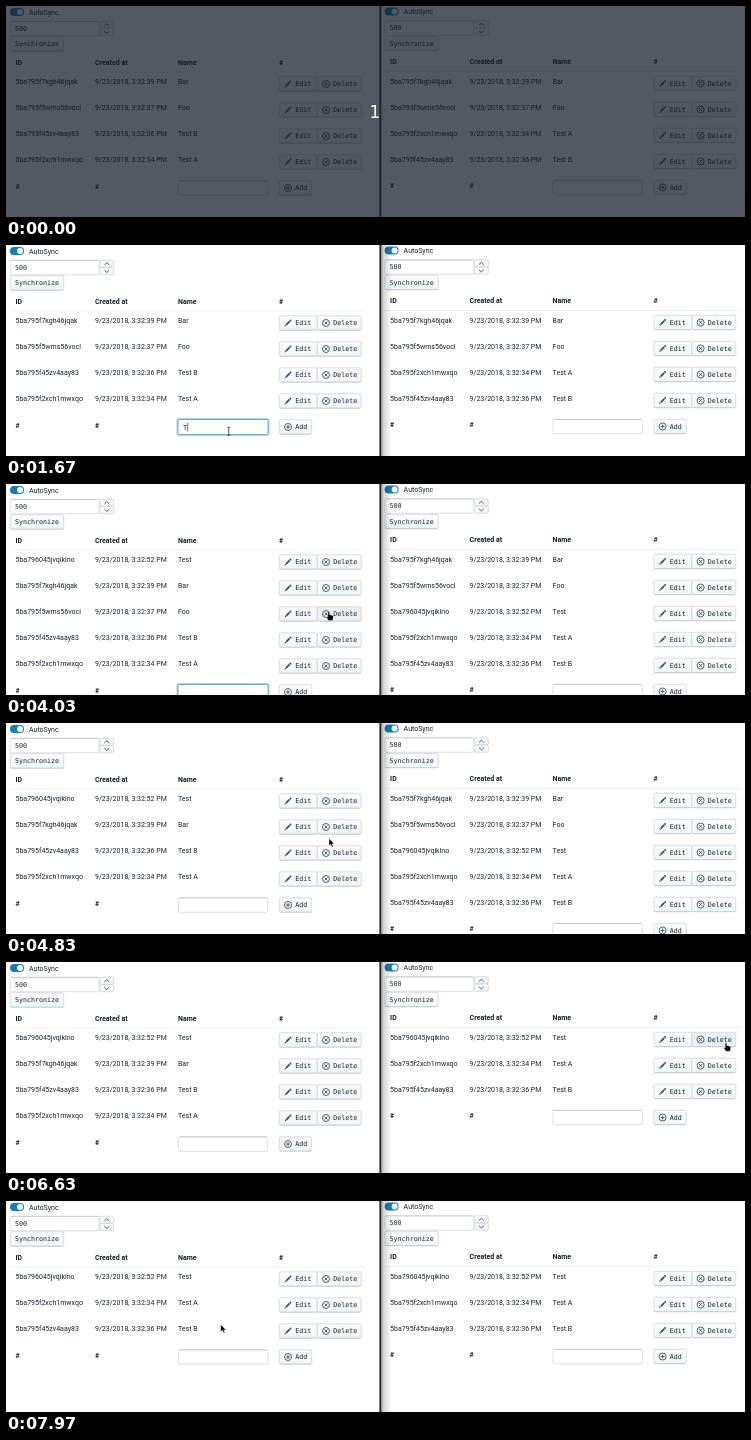
An HTML page that plays this animation: 739x211 px, repeating every 8000 ms.

```html
<!DOCTYPE html>
<html lang="en">
<head>
<meta charset="utf-8">
<title>Synchronized tables</title>
<style>
  html, body { margin: 0; width: 100%; height: 100%; overflow: hidden; background: #fff; }
  svg { display: block; width: 739px; height: 211px; }
  text { font: 7px Roboto, sans-serif; fill: #182026; white-space: pre; }
  .bold { font-weight: 700; }
  .mono { font: 6.67px "DejaVu Sans Mono", monospace; }
  .count { font: 17px "DejaVu Sans", sans-serif; fill: #fff; text-anchor: middle; }
  .icon { fill: #3f4d58; }
  .line { fill: none; stroke: #3f4d58; stroke-width: .9; }
</style>
</head>
<body>
<svg viewBox="0 0 739 211" xmlns="http://www.w3.org/2000/svg">
  <defs>
    <linearGradient id="face" x2="0" y2="1">
      <stop stop-color="#fafcfd"/><stop offset="1" stop-color="#f2f5f7"/>
    </linearGradient>
    <linearGradient id="shade">
      <stop stop-opacity=".4"/><stop offset=".25" stop-opacity=".16"/><stop offset="1" stop-opacity="0"/>
    </linearGradient>
    <g id="edit"><path class="icon" transform="scale(.5)" d="M3.2 10.3l2.5 2.5 6.7-6.7-2.5-2.5zM1 15l3.9-1.4-2.5-2.4zM13.2 1c-.5 0-.9.2-1.2.5l-1.4 1.4 2.4 2.5 1.5-1.4c.9-1.2.1-3-1.3-3z"/></g>
    <g id="delete" class="line"><circle cx="4" cy="4" r="3.5"/><path d="M2.5 2.5l3 3m0-3l-3 3"/></g>
    <g id="add" class="line"><circle cx="4" cy="4" r="3.5"/><path d="M2 4h4M4 2v4"/></g>
    <path id="arrow" d="M0 0v7.3l1.7-1.5 1.3 2.8 1.2-.5L3 5.4h2.3z" fill="#000" stroke="#fff" stroke-width=".4"/>
    <path id="hand" d="M-.8 .6q.8-1 1.5 0v2.5l3.3.8q1 .4.8 1.4l-.7 3.7H-.1L-2.2 5.8q.1-1 1.4-.2z" fill="#000" stroke="#fff" stroke-width=".4"/>
    <path id="beam" d="M-1.5-4h3M0-4v8M-1.5 4h3" stroke="#222" stroke-width=".7" fill="none"/>
  </defs>
  <rect width="739" height="211" fill="#fff"/>
  <g id="right" transform="translate(374.6 -.5)"></g>
  <rect id="shadow" x="375" height="211" fill="url(#shade)"/>
  <rect width="374" height="211" fill="#fff"/>
  <g id="left"></g>
  <rect x="373.4" width="1.7" height="211" fill="#24282c"/>
  <use id="cursor"/>
  <g id="countdown">
    <rect width="739" height="211" fill="#141c26" fill-opacity=".73"/>
    <text class="count" x="369" y="111.5">1</text>
  </g>
</svg>
<script>
const LOOP = 8000, PITCH = 26, FIRST = 78;
const RIGHT = { x: 374.6, y: -.5 }, LEFT = { x: 0, y: 0 };
const EVER = [0, Infinity];

// left / right: the span of time in which each pane lists the item
const items = [
  { id: '5ba796045jvqiklno', name: 'Test', time: '3:32:52', left: [2330, Infinity], right: [2970, Infinity] },
  { id: '5ba795f7kgh46jqak', name: 'Bar', time: '3:32:39', left: [0, 7000], right: [0, 6430] },
  { id: '5ba795f5wms56vocl', name: 'Foo', time: '3:32:37', left: [0, 4470], right: [0, 4970] },
  { id: '5ba795f45zv4aay83', name: 'Test B', time: '3:32:36', left: EVER, right: EVER },
  { id: '5ba795f2xch1mwxqo', name: 'Test A', time: '3:32:34', left: EVER, right: EVER }
];

// pointer stops: time, x, y
const path = [
  [430, 201, 31], [730, 222.7, 186.3], [3470, 222.7, 186.3], [4030, 322.6, 127.5],
  [4470, 322.6, 127.5], [5170, 323.4, 104.5], [5370, 323.4, 104.5], [5470, 503.5, 108],
  [5740, 503.5, 108], [5770, 729, 101.5], [5970, 729, 101.5], [6230, 720, 80.3],
  [6730, 720, 80.3], [7230, 226.5, 57.5], [7370, 228, 57.5], [7870, 228, 57.5], [7970, 214.7, 123.5]
];

const $ = id => document.getElementById(id);
const between = (t, [from, to]) => t >= from && t < to;
const inside = (p, b) => p.x >= b.x && p.x < b.x + b.w && p.y >= b.y && p.y < b.y + 15;

function pointer(t) {
  let i = path.findIndex(k => k[0] > t);
  if (i < 0) i = path.length;
  const a = path[Math.max(i - 1, 0)], b = path[Math.min(i, path.length - 1)];
  const u = b[0] > a[0] ? (t - a[0]) / (b[0] - a[0]) : 0;
  const e = u * u * (3 - 2 * u);
  return { x: a[1] + (b[1] - a[1]) * e, y: a[2] + (b[2] - a[2]) * e };
}

const byName = (a, b) => a.name < b.name ? -1 : 1;
const byTime = (a, b) => a.time < b.time ? 1 : -1;
const byNameDown = (a, b) => byName(b, a);

function rows(side, t) {
  const order = side === 'right' || t >= 7900 ? byName : t >= 7570 ? byNameDown : byTime;
  return items.filter(item => between(t, item[side])).sort(order);
}

const text = (x, y, s, cls = '') => `<text x="${x}" y="${y + 2.5}" class="${cls}">${s}</text>`;

const box = (x, y, w, h, fill, line) =>
  `<rect x="${x + .25}" y="${y + .25}" width="${w - .5}" height="${h - .5}" rx="1.5" fill="${fill}" stroke="${line}" stroke-width=".6"/>`;

const field = (x, y, w) => box(x, y, w, 15, '#fff', '#c6cbcf') +
  `<path d="M${x + 1} ${y + .5}h${w - 2}" stroke="#aeb5ba" stroke-width=".5"/>`;

function button(b, label, icon, hover) {
  const tx = b.x + (icon ? 16.2 : 5);
  return box(b.x, b.y, b.w, 15, hover ? '#e9eff3' : 'url(#face)', '#c3c8cc') +
    `<path d="M${b.x + 1} ${b.y + 14.6}h${b.w - 2}" stroke="#b4babf" stroke-width=".5"/>` +
    (icon ? `<use href="#${icon}" x="${b.x + 5}" y="${b.y + 3.5}"/>` : '') +
    text(tx, b.y + 7.4, label, 'mono');
}

const chevrons = () => box(93.5, 15, 14.5, 7.6, 'url(#face)', '#c3c8cc') +
  box(93.5, 22.4, 14.5, 7.6, 'url(#face)', '#c3c8cc') +
  '<path class="line" d="M98.4 20l2.4-2.3 2.4 2.3M98.4 25.2l2.4 2.3 2.4-2.3"/>';

const header = '<rect x="4" y="2" width="14" height="8" rx="4" fill="#137cbd"/><circle cx="14" cy="6" r="3" fill="#fff"/>' +
  text(23, 6.3, 'AutoSync') + field(4, 15, 89.5) + text(9, 22.4, '500', 'mono') + chevrons() +
  button({ x: 4, y: 30.5, w: 54 }, 'Synchronize') +
  text(9.5, 56, 'ID', 'bold') + text(89, 56, 'Created at', 'bold') +
  text(172, 56, 'Name', 'bold') + text(273, 56, '#', 'bold') +
  '<path d="M4 66h356" stroke="#e4e7e9" stroke-width=".6"/>';

function typed(t) {
  if (!between(t, [1670, 2330])) return '';
  return 'Test'.slice(0, t < 1930 ? 1 : t < 2070 ? 3 : 4);
}

function nameField(y, t, focus) {
  let out = field(172, y, 90);
  if (!focus) return out;
  out += `<rect x="171.2" y="${y - .8}" width="91.6" height="16.6" rx="2" fill="none" stroke="#137cbd" stroke-opacity=".3" stroke-width="1.5"/>` +
    box(171.7, y - .3, 90.6, 15.6, '#fff', '#137cbd');
  const word = typed(t);
  out += text(177, y + 7.5, word);
  const end = 177.2 + [0, 4.3, 0, 11.8, 14.1][word.length];
  if (t < 3470) out += `<rect x="${end}" y="${y + 3.3}" width=".6" height="8.5" fill="#182026"/>`;
  return out;
}

// returns the pane's markup and the pointer shape over it
function pane(side, t, mouse, origin) {
  const p = { x: mouse.x - origin.x, y: mouse.y - origin.y };
  let out = header, shape = '';
  const press = (b, label, icon) => {
    const hover = t >= 430 && inside(p, b);
    if (hover) shape = 'hand';
    out += button(b, label, icon, hover);
  };
  const list = rows(side, t);
  list.forEach((item, i) => {
    const mid = FIRST + i * PITCH, y = mid - 7.5;
    out += text(9.5, mid - 2.5, item.id) + text(89, mid - 2.5, `9/23/2018, ${item.time} PM`) +
      text(172, mid - 2.5, item.name);
    press({ x: 273, y, w: 38.5 }, 'Edit', 'edit');
    press({ x: 311, y, w: 44.5 }, 'Delete', 'delete');
  });
  const mid = FIRST + list.length * PITCH, y = mid - 7.5;
  out += text(9.5, mid - 2, '#', 'bold') + text(89, mid - 2, '#', 'bold');
  out += nameField(y, t, side === 'left' && between(t, [1100, 4470]));
  press({ x: 273, y, w: 33 }, 'Add', 'add');
  if (inside(p, { x: 172, y, w: 90 })) shape = 'beam';
  return { out, shape };
}

const shown = {};
function put(side, out) {
  if (shown[side] === out) return;
  shown[side] = out;
  $(side).innerHTML = out;
}

function draw(t) {
  const mouse = pointer(t);
  const left = pane('left', t, mouse, LEFT), right = pane('right', t, mouse, RIGHT);
  put('left', left.out);
  put('right', right.out);
  const active = between(t, [1100, 6730]) || t >= 7570;
  $('shadow').setAttribute('width', active ? 11 : 3);
  $('shadow').setAttribute('opacity', active ? 1 : .5);
  const cursor = $('cursor');
  cursor.setAttribute('href', '#' + (left.shape || right.shape || 'arrow'));
  cursor.setAttribute('transform', `translate(${mouse.x} ${mouse.y})`);
  cursor.style.display = t < 400 ? 'none' : '';
  $('countdown').style.display = t < 400 ? '' : 'none';
}

const start = performance.now();
function tick() {
  draw((performance.now() - start) % LOOP);
  requestAnimationFrame(tick);
}
tick();
</script>
</body>
</html>
```
